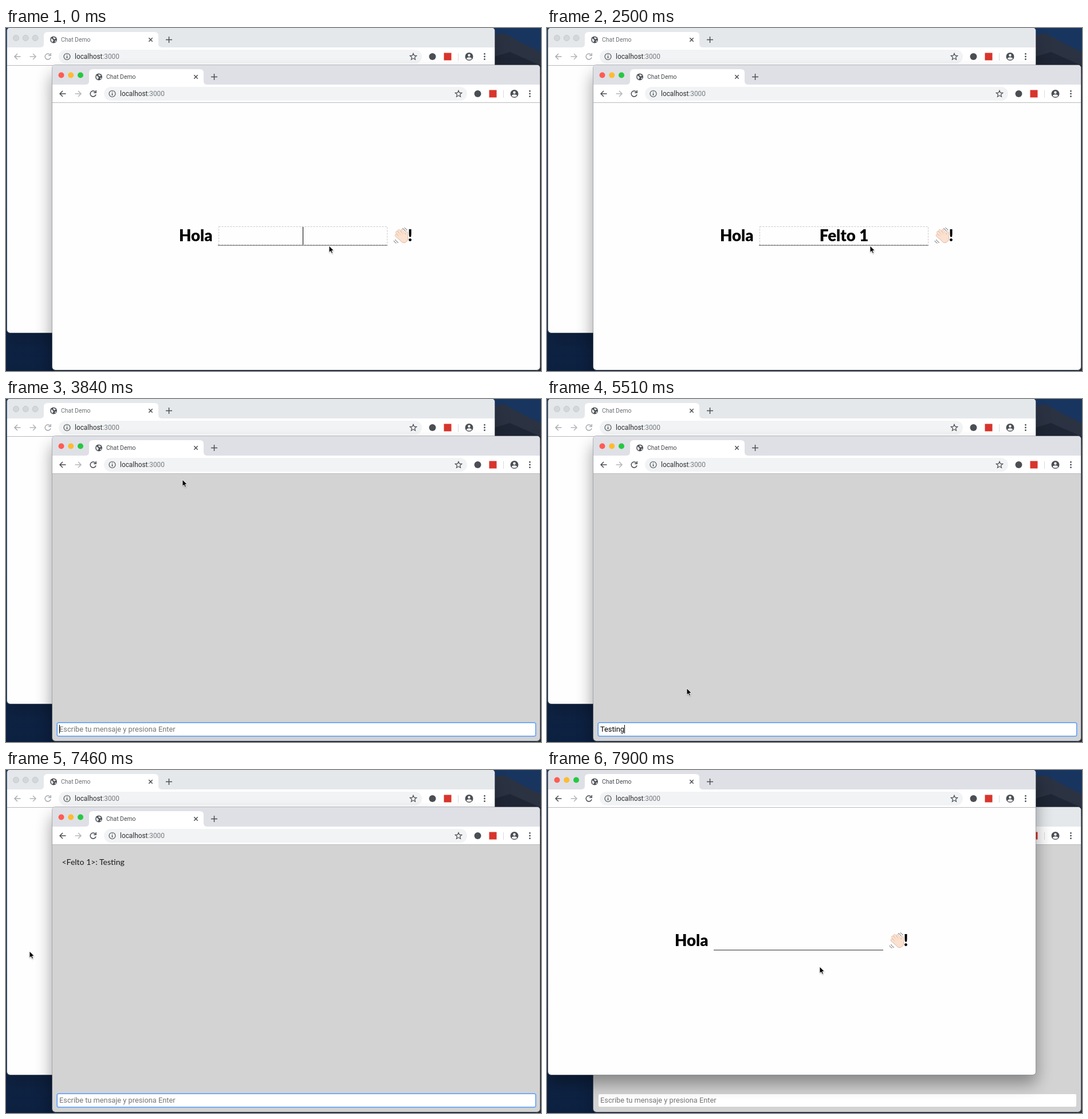
An HTML page that plays this animation: 934 px wide and 600 px high, repeating every 7990 ms.

```html
<!DOCTYPE html>
<html lang="es">
<head>
<meta charset="utf-8">
<title>Chat Demo</title>
<style>
html, body { margin: 0; width: 100%; height: 100%; overflow: hidden; background: #10233f; }
svg { display: block; width: 100vw; height: 100vh; }
text { font-family: Roboto, Inter, sans-serif; white-space: pre; }
.shadow { opacity: .36; filter: url(#soft); }
.bar { fill: #dee0e6; }
.title { font-size: 10.4px; fill: #45494d; }
.url { font-size: 11.85px; fill: #2b2e31; }
.url tspan { fill: #777b80; }
.line { fill: none; stroke: #4b4f54; stroke-width: 1.5; }
.thin { stroke-width: 1.2; }
.dim { stroke: #b4b7ba; }
.dark { fill: #4b4f54; }
.idle .shadow { opacity: .2; }
.idle .bar { fill: #e5e8eb; }
.idle .light { fill: #d4d7da; stroke: #c6c9cc; }
.idle .title { fill: #6b6f73; }
.idle .nav { stroke: #a9acb0; }
.hola text { font: 900 27.6px Lato, "Open Sans", sans-serif; fill: #000; }
.msg { font: 14px Lato, "Open Sans", sans-serif; fill: #161616; }
.field { font-size: 12.8px; }
</style>
</head>
<body>
<svg viewBox="0 0 934 600" preserveAspectRatio="none">
  <defs>
    <filter id="soft" x="-10%" y="-15%" width="120%" height="130%"><feGaussianBlur stdDeviation="14"/></filter>
    <filter id="haze" x="-50%" y="-50%" width="200%" height="200%"><feGaussianBlur stdDeviation="1"/></filter>
    <linearGradient id="sky" x2="0" y2="1">
      <stop offset="0" stop-color="#183560"/><stop offset=".5" stop-color="#1b3459"/>
      <stop offset="1" stop-color="#0c2040"/>
    </linearGradient>
  </defs>
  <rect width="934" height="600" fill="url(#sky)"/>
  <path d="M840 14L870 9L904 28L934 42V600H926V120H840Z" fill="#2b3242"/>
  <path d="M853 50L880 42L934 66V80H853Z" fill="#1f2635"/>
  <g id="windows"></g>
  <g id="pointer">
    <path d="M0 1.5V13L3 10.5L5 15L7 14L5 10H9Z" opacity=".3" filter="url(#haze)"/>
    <path d="M0 0V11.6L2.7 9.2L4.5 13.3L6.5 12.4L4.8 8.5H8.4Z" stroke="#fff" stroke-width=".9"/>
  </g>
</svg>
<script>
const LOOP = 7990, STEP = 88, BLINK = 525;
const NAME = 'Felto 1', WORD = 'Testing';
const HINT = 'Escribe tu mensaje y presiona Enter';
const ENTER = 2590, SEND = 5690, RAISE = 7550;
const nameTyping = { from: 1170, to: 1970 }, wordTyping = { from: 4990, to: 5510 };

const hand = () => {
  const fingers = [-2, -1, 0, 1].map(i =>
    `M${3.4 * i + 1.5} 2L${4.4 * i + 2} ${-11 + 1.6 * (i + .5) ** 2}`).join('') + 'M4 8L10.5 1';
  const stroke = (color, width) =>
    `<path d="${fingers}" fill="none" stroke-linecap="round" stroke="${color}" stroke-width="${width}"/>`;
  const waves = '<path d="M1 -13.5Q5 -12 6.5 -8M4.5 -14.5Q8 -13 9 -10" fill="none" stroke="#666"/>';
  return `<g transform="translate(610 299)">
    <g transform="rotate(-40)">${stroke('#d9ad92', 4.6)}
      <rect x="-7" y="-1" width="14" height="13.5" rx="6" fill="#fae1d0" stroke="#d9ad92" stroke-width=".8"/>
      ${stroke('#fae1d0', 3.6)}</g>
    ${waves}<g transform="translate(-5 -2) rotate(180)">${waves}</g></g>`;
};

const greeting = () => `<g class="hola">
  <text x="221" y="308">Hola</text>
  <path d="M289 315H585" stroke="#222" stroke-width="1.2"/>
  ${hand()}<text x="620.5" y="308">!</text></g>`;

const frame = (id, x, y, page) => {
  const lights = ['#ff5b52', '#fdbc2e', '#27c840'].map((fill, i) =>
    `<circle class="light" cx="${15.5 + 16.75 * i}" cy="17.5" r="5" fill="${fill}"/>`).join('');
  const dots = [-1, 0, 1].map(i =>
    `<circle class="dark" cx="833.5" cy="${50 + 4.7 * i}" r="1.4"/>`).join('');
  const star = Array.from({ length: 10 }, (_, i) => {
    const r = i % 2 ? 2.7 : 6, a = i * Math.PI / 5;
    return `${709 + r * Math.sin(a)},${50.4 - r * Math.cos(a)}`;
  }).join(' ');
  return `<g id="${id}" transform="translate(${x} ${y})">
  <rect class="shadow" x="-2" y="16" width="855" height="533" rx="8"/>
  <rect x="-.5" y="-.5" width="852" height="534" rx="5.5" fill="none" stroke="#858a91" stroke-opacity=".6"/>
  <rect class="page" width="851" height="533" rx="5" fill="#fefefe"/>
  <path class="bar" d="M0 35V5Q0 0 5 0H846Q851 0 851 5V35Z"/>
  <path d="M57 34Q64 34 64 28V13Q64 7 71 7H257Q264 7 264 13V28Q264 34 271 34H851V65H0V34Z" fill="#fff"/>
  <path d="M0 65.5H851" stroke="#b9babc"/>
  ${lights}
  <circle class="dark" cx="81" cy="20.5" r="6"/>
  <path d="M77 18Q80 19 81 22L79 25Q75 22 77 18ZM81 15.5L85 18L83 20L80 18ZM83 22H86L84 25Z" fill="#fff" opacity=".85"/>
  <text class="title" x="94" y="24.2">Chat Demo</text>
  <path class="line" d="M247.3 17.3L253.7 23.7M253.7 17.3L247.3 23.7M277 20.5H288M282.5 15V26"/>
  <path class="line nav" d="M23.5 50H13M18 45L13 50L18 55"/>
  <path class="line dim" d="M39.5 50H50M45 45L50 50L45 55"/>
  <path class="line nav" d="M75 46.8A5 5 0 1 0 76 51.2M76.2 44V48.2H72"/>
  <rect x="90" y="38" width="634" height="24" rx="12" fill="#f1f3f4"/>
  <circle class="line thin" cx="104.5" cy="50" r="5.5"/>
  <path class="line" d="M104.5 49V53M104.5 46.2V47.6"/>
  <text class="url" x="118" y="54">localhost<tspan>:3000</tspan></text>
  <polygon class="line thin" points="${star}"/>
  <circle class="dark" cx="742.5" cy="50" r="6"/>
  <rect x="762.5" y="43.5" width="13" height="13" fill="#d8352c"/>
  <path d="M787.5 44V57" stroke="#d8dadd"/>
  <circle class="dark" cx="806.5" cy="50" r="7"/>
  <circle cx="806.5" cy="47.8" r="2.2" fill="#fff"/>
  <path d="M802 54Q802 51.3 806.5 51.3T811 54Q806.5 57 802 54Z" fill="#fff"/>
  ${dots}${page}</g>`;
};

const frontPage = `<g id="hello">${greeting()}
  <rect x="290.5" y="282.5" width="294" height="32" fill="none" stroke="#c9c9c9" stroke-dasharray="3 2"/>
  <g class="hola"><text id="name" x="437.5" y="308" text-anchor="middle"></text></g>
  <rect id="nameCaret" y="283" width="1" height="31"/></g>
  <g id="chat"><text id="line" class="msg" x="16.5" y="100.5">&lt;${NAME}&gt;: ${WORD}</text>
  <rect id="ring" x="7.5" y="500.5" width="837" height="25" rx="3.5" fill="#5a9bf3" stroke="#8bb8f5"/>
  <rect x="9" y="502" width="834" height="22" rx="2" fill="#fff"/>
  <text id="field" class="field" x="12" y="517.3"></text>
  <rect id="fieldCaret" y="505" width="1" height="15"/></g>`;

const $ = id => document.getElementById(id);
const layers = $('windows');
layers.innerHTML = frame('back', 2, 0, greeting()) + frame('front', 81, 65, frontPage);

// Each sweep is a smooth curve through points that lie two steps apart.
const sweeps = [
  { from: 3660, points: [[564, 381], [308, 141], [130, 92], [60, 240], [140, 405], [244, 506]] },
  { from: 6404, points: [[244, 506], [335, 470], [530, 405], [490, 410], [296, 360], [57, 300], [41, 317]] },
  { from: 7548, points: [[41, 317], [230, 332], [476, 344]] }
];

function pointerAt(t) {
  const { from, points } = sweeps.findLast(s => s.from <= t) || sweeps[0];
  const last = points.length - 1;
  const u = Math.min(last, Math.max(0, Math.floor((t - from) / STEP) / 2));
  const i = Math.min(last - 1, Math.floor(u)), f = u - i;
  const at = k => points[Math.min(last, Math.max(0, k))];
  return [0, 1].map(axis => {
    const [a, b, c, d] = [-1, 0, 1, 2].map(k => at(i + k)[axis]);
    return b + f / 2 * (c - a + f * (2 * a - 5 * b + 4 * c - d + f * (3 * (b - c) + d - a)));
  });
}

function typedText(text, { from, to }, t) {
  const gap = (to - from) / (text.length - 1);
  return text.slice(0, Math.max(0, Math.floor((t - from) / gap + 1.001)));
}

// Any input makes the caret solid; it blinks again once the input stops.
const inputs = [
  { from: -260, to: -260 }, nameTyping, { from: ENTER, to: ENTER - 80 },
  wordTyping, { from: SEND, to: SEND - 80 }
];

function caretOn(t) {
  const idle = t - inputs.findLast(i => i.from <= t).to;
  return idle < 0 || idle % (2 * BLINK) < BLINK;
}

const show = (id, on) => $(id).setAttribute('display', on ? 'inline' : 'none');

function setText(id, value) {
  if ($(id).textContent !== value) $(id).textContent = value;
  return value ? $(id).getComputedTextLength() : 0;
}

function render(t) {
  const raised = t >= RAISE, chatting = t >= ENTER, caret = caretOn(t);
  const top = $(raised ? 'back' : 'front');
  if (layers.lastElementChild !== top) layers.append(top);
  $('front').setAttribute('class', raised ? 'idle' : '');
  $('back').setAttribute('class', raised ? '' : 'idle');
  $('front').querySelector('.page').setAttribute('fill', chatting ? '#d3d3d3' : '#fefefe');

  show('hello', !chatting);
  show('chat', chatting);
  show('line', t >= SEND);
  show('ring', !raised);
  show('nameCaret', caret);
  show('fieldCaret', caret && !raised);

  const nameWidth = setText('name', typedText(NAME, nameTyping, t));
  $('nameCaret').setAttribute('x', Math.round(437 + nameWidth / 2));

  const typed = t < SEND ? typedText(WORD, wordTyping, t) : '';
  const fieldWidth = setText('field', typed || HINT);
  $('field').setAttribute('fill', typed ? '#000' : '#757575');
  $('fieldCaret').setAttribute('x', Math.round(12 + (typed ? fieldWidth : 0)));

  $('pointer').setAttribute('transform', `translate(${pointerAt(t)})`);
}

const start = performance.now();
function tick() {
  render((performance.now() - start) % LOOP);
  requestAnimationFrame(tick);
}
tick();
</script>
</body>
</html>
```
